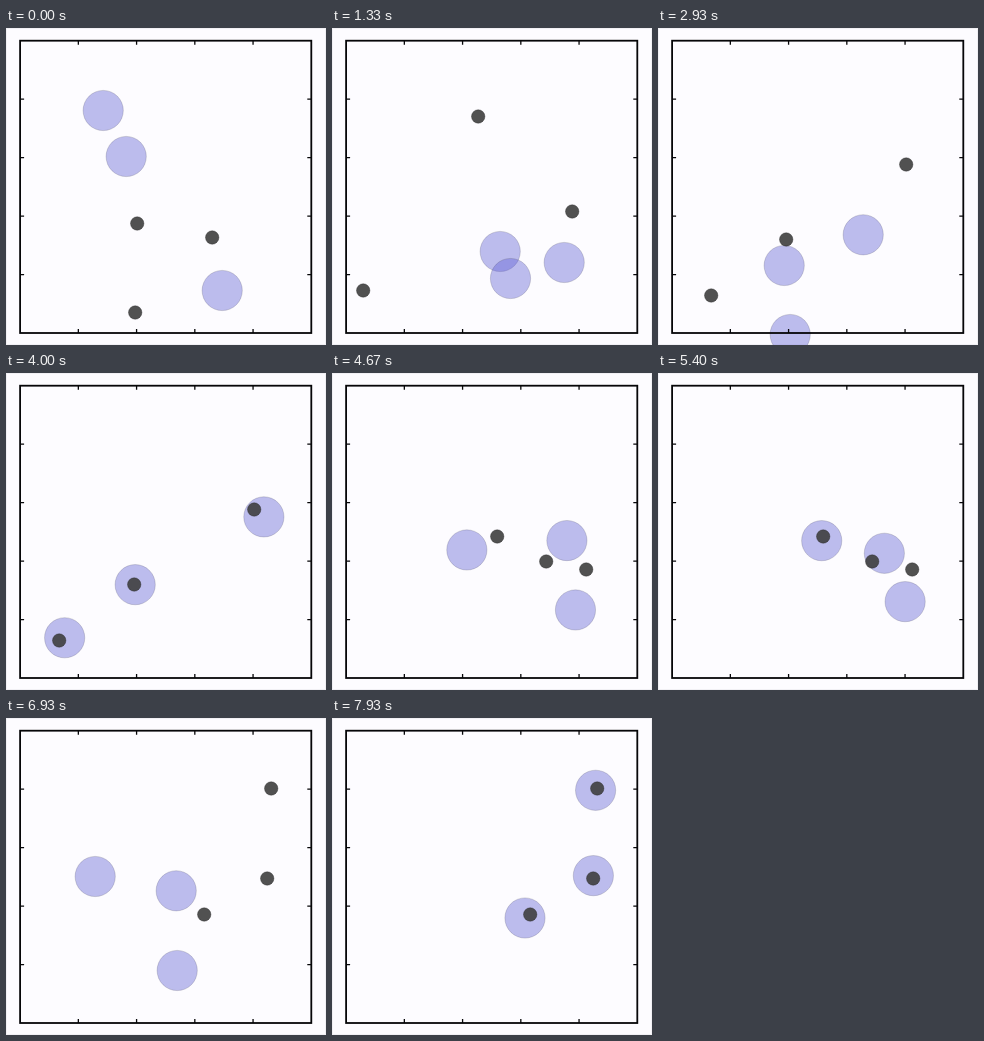
Animation, 320 px wide and 317 px high, one loop 8000 ms. Source, as an HTML page with a canvas:

```html
<!DOCTYPE html>
<html lang="en">
<head>
<meta charset="utf-8">
<title>Cooperative navigation</title>
<style>
  html, body { margin: 0; width: 100%; height: 100%; overflow: hidden; background: #fdfcff; }
  canvas { display: block; width: 320px; height: 317px; }
</style>
</head>
<body>
<canvas id="stage"></canvas>
<script>
const LOOP = 8000, STEP = 1000 / 15, LAST_STEP = 119;
const WIDTH = 320, HEIGHT = 317;
const BOX = { left: 14.1, top: 12.7, right: 305.3, bottom: 305 };
const STIFFNESS = 0.45;

// An agent starts at `from` and settles beside its landmark, off by `miss`.
const agent = (from, landmark, miss = [0, 0]) => ({ from, landmark, miss });

const rounds = [
  { start: 0, agents: [
    agent([97, 82], [131, 195]),
    agent([120, 128], [206, 209]),
    agent([216, 262], [129, 284])] },
  { start: 20, agents: [
    agent([168, 223], [146, 88], [0, 6]),
    agent([232, 234], [240, 183], [12, 6]),
    agent([178.3, 250], [31, 262], [13, 14])] },
  { start: 44, agents: [
    agent([126, 237], [128, 211], [1, 0]),
    agent([205, 206.3], [248, 136], [10, 7]),
    agent([132, 306], [53, 267], [5, -3])] },
  { start: 64, agents: [
    agent([46, 205], [165, 163], [-1, 4]),
    agent([261, 128], [214, 188], [12, -8]),
    agent([232, 262], [254, 196], [-7, 32])] },
  { start: 84, agents: [
    agent([73, 62], [126, 178]),
    agent([205, 150], [246, 200]),
    agent([170, 262], [106, 281], [-2, 7])] },
  { start: 104, agents: [
    agent([89, 158], [265, 70], [0, 1]),
    agent([170, 172.3], [261, 160], [1, -3]),
    agent([171, 252], [198, 196], [-5, 3])] }
];

const canvas = document.getElementById("stage");
const scale = window.devicePixelRatio || 1;
canvas.width = WIDTH * scale;
canvas.height = HEIGHT * scale;
const ctx = canvas.getContext("2d");
ctx.scale(scale, scale);

// Critically damped spring: 0 at rest, tending to 1.
function spring(steps) {
  const t = STIFFNESS * steps;
  return 1 - (1 + t) * Math.exp(-t);
}

function positionAt({ from, landmark, miss }, steps) {
  const progress = spring(steps);
  return from.map((start, axis) =>
    start + (landmark[axis] + miss[axis] - start) * progress);
}

function disc([x, y], radius, fill, edge) {
  ctx.beginPath();
  ctx.arc(x + 0.2, y + 0.5, radius, 0, 2 * Math.PI);
  ctx.fillStyle = fill;
  ctx.fill();
  ctx.strokeStyle = edge;
  ctx.lineWidth = 0.8;
  ctx.stroke();
}

function line(x, y, dx, dy) {
  ctx.moveTo(x, y);
  ctx.lineTo(x + dx, y + dy);
}

function drawAxes() {
  const { left, top, right, bottom } = BOX;
  ctx.strokeStyle = "#060608";
  ctx.lineWidth = 1.8;
  ctx.strokeRect(left, top, right - left, bottom - top);
  ctx.lineWidth = 1.3;
  ctx.beginPath();
  for (let i = 1; i < 5; i++) {
    const x = left + (right - left) * i / 5;
    const y = top + (bottom - top) * i / 5;
    line(x, top, 0, 4);
    line(x, bottom, 0, -4);
    line(left, y, 4, 0);
    line(right, y, -4, 0);
  }
  ctx.stroke();
}

function draw(step) {
  const { start, agents } = rounds.filter(round => round.start <= step).pop();
  ctx.fillStyle = "#fdfcff";
  ctx.fillRect(0, 0, WIDTH, HEIGHT);
  ctx.strokeStyle = "#f1f0f4";
  ctx.lineWidth = 1;
  ctx.strokeRect(0.5, 0.5, WIDTH - 1, HEIGHT - 1);
  for (const each of agents)
    disc(positionAt(each, step - start), 20.1, "rgba(90,90,211,.4)", "rgba(60,60,80,.25)");
  for (const { landmark } of agents)
    disc(landmark, 6.7, "rgba(62,62,62,.9)", "rgba(40,40,40,.5)");
  drawAxes();
}

const origin = performance.now();
function tick() {
  const time = (performance.now() - origin) % LOOP;
  draw(Math.min(LAST_STEP, Math.floor((time + 4) / STEP)));
  requestAnimationFrame(tick);
}
tick();
</script>
</body>
</html>
```
